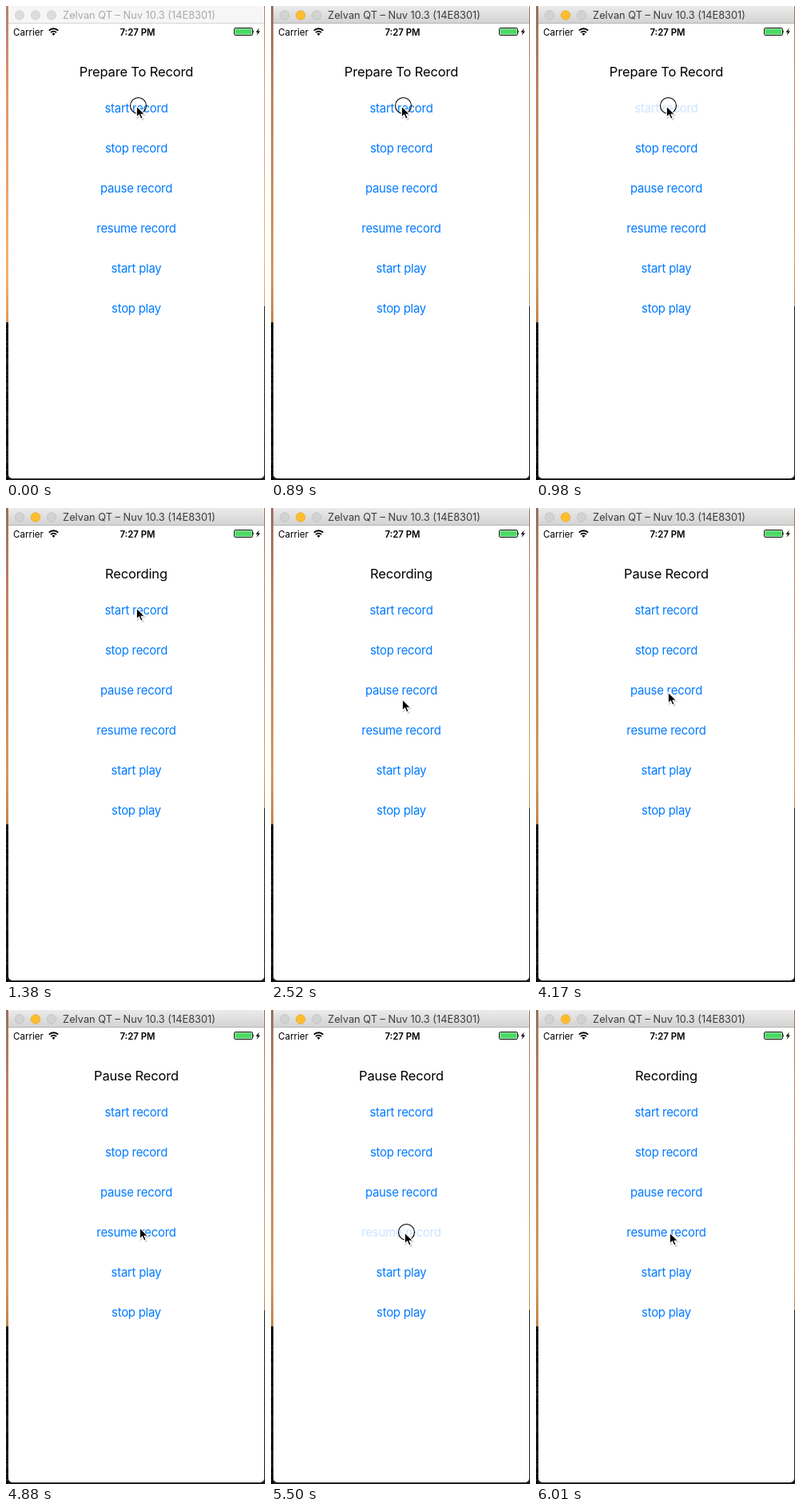
Write an HTML page that moves like this. It is 324 by 592 pixels and loops after 8 s.

```html
<!DOCTYPE html>
<html lang="en">
<head>
<meta charset="utf-8">
<title>Recorder demo</title>
<style>
html, body { margin: 0; width: 100%; height: 100%; overflow: hidden; }
svg { display: block; width: 324px; height: 592px; font-family: Inter, Roboto, sans-serif; }
.mid { text-anchor: middle; }
#buttons { font-size: 14.9px; letter-spacing: -.25px; fill: #007aff; }
#bar { fill: #f6f6f6; }
#rule { stroke: #d6d6d6; }
#caption { fill: #a9a9a9; }
#lights { fill: #dcdcdc; stroke: #d0d0d0; }
.active #bar { fill: url(#metal); }
.active #rule { stroke: #b5b5b5; }
.active #caption { fill: #3c3c3c; }
.active #lights { fill: #d2d2d2; stroke: #bebebe; }
.active #yellow { fill: #ffbd2e; stroke: #e6a82a; }
#shade { opacity: 0; }
.active #shade { opacity: .14; }
</style>
</head>
<body>
<svg id="stage" viewBox="0 0 324 592">
  <defs>
    <linearGradient id="sky" x2="0" y2="1">
      <stop offset="0" stop-color="#b5806a"/>
      <stop offset=".25" stop-color="#dc966c"/>
      <stop offset=".85" stop-color="#f4b26c"/>
      <stop offset="1" stop-color="#e09c58"/>
    </linearGradient>
    <linearGradient id="metal" x2="0" y2="1">
      <stop offset="0" stop-color="#ebebeb"/>
      <stop offset="1" stop-color="#d2d2d2"/>
    </linearGradient>
  </defs>

  <rect width="324" height="592" fill="#20231f"/>
  <rect width="3" height="395" fill="url(#sky)"/>
  <rect x="323" width="1" height="375" fill="url(#sky)"/>
  <g id="forest"></g>
  <rect id="shade" width="324" height="592"/>
  <rect x="3" y="-6" width="320" height="596" rx="5" fill="#fff"/>

  <path id="bar" d="M3 22V4q0-4 4-4H319q4 0 4 4V22z"/>
  <path id="rule" d="M3 21.5H323"/>
  <g id="lights" stroke-width=".8">
    <circle cx="17" cy="11.5" r="5.7"/>
    <circle id="yellow" cx="37" cy="11.5" r="5.7"/>
    <circle cx="57" cy="11.5" r="5.7"/>
  </g>
  <text id="caption" class="mid" x="166.5" y="16" font-size="12.8">Zelvan QT – Nuv 10.3 (14E8301)</text>

  <text x="9" y="36.5" font-size="11.6">Carrier</text>
  <g fill="none" stroke="#000" stroke-width="1.9">
    <path d="M53.8 30.7a7.8 7.8 0 0 1 11.4 0M56 33.1a4.9 4.9 0 0 1 7 0"/>
    <path d="M59.5 36.9l-2-2.2a2.8 2.8 0 0 1 4 0z" fill="#000" stroke="none"/>
  </g>
  <text class="mid" x="164.5" y="36.5" font-size="11.4" font-weight="600">7:27 PM</text>
  <rect x="285.5" y="27.5" width="23" height="9" rx="1.6" fill="#fff" stroke="#111"/>
  <rect x="286.5" y="28.5" width="21" height="7" rx=".7" fill="#4cd964"/>
  <path d="M309.3 30.3q1.7 1.7 0 3.4z"/>
  <path d="M316.8 27.5l-4.3 5.2h2.5l-1.5 4 4.5-5.3h-2.6z"/>

  <text id="status" class="mid" x="163" y="88" font-size="16.5" letter-spacing="-.16"></text>
  <g id="buttons" class="mid"></g>
  <circle id="ring" r="10" fill="none" stroke="#000" stroke-width="1.1"/>
  <g id="cursor">
    <path d="M1 2V17.5L5 14.5 7.5 19 10.5 18 8.7 13H13z" opacity=".18"/>
    <path d="M.8 1.2V15L4 12 6.2 17 8.6 16 6.6 11.2H11z" stroke="#fff" stroke-width="1.1"/>
  </g>
</svg>
<script>
const $ = id => document.getElementById(id);
const LOOP = 8000, ACTIVE_AT = 890, STEP = 80, FADE = 350;

const labels = ['start record', 'stop record', 'pause record', 'resume record', 'start play', 'stop play'];
$('buttons').innerHTML = labels.map((s, i) => `<text x="163" y="${132.5 + i * 50}">${s}</text>`).join('');
const buttons = [...$('buttons').children];

// Speckled treetops beside the window
for (let y = 396; y < 592; y += 2) {
  const light = 9 + 7 * Math.sin(y * y);
  $('forest').innerHTML += `<rect y="${y}" width="3" height="2" fill="hsl(110 8% ${light}%)"/>`;
}

const taps = [
  { press: 980, release: 1040, button: 0, status: 'Recording' },
  { press: 3730, release: 3820, button: 2, status: 'Pause Record' },
  { press: 5500, release: 5590, button: 3, status: 'Recording' }
];
const home = { x: 162, y: 124 };
const glides = [
  { at: 2090, steps: 3, x: 164, y: 246 },
  { at: 2440, steps: 6, x: 163, y: 234 },
  { at: 3410, steps: 2, x: 164, y: 229 },
  { at: 4700, steps: 6, x: 166, y: 277 }
];

const mix = (a, b, p) => a + (b - a) * p;
const easeOut = p => 1 - (1 - p) ** 3;
const stepsSince = (t, from) => Math.floor((t - from) / STEP) + 1;
const isPressed = (t, tap) => t >= tap.press && t < tap.release;

function buttonAlpha(t, tap) {
  if (isPressed(t, tap)) return .2;
  if (t < tap.press || t >= tap.release + FADE) return 1;
  return mix(.2, 1, Math.min(1, stepsSince(t, tap.release) * STEP / FADE));
}

function cursorAt(t) {
  let { x, y } = home;
  for (const g of glides) {
    if (t < g.at) break;
    const p = easeOut(Math.min(1, stepsSince(t, g.at) / g.steps));
    x = Math.round(mix(x, g.x, p));
    y = Math.round(mix(y, g.y, p));
  }
  return { x, y };
}

function draw(t) {
  $('stage').classList.toggle('active', t >= ACTIVE_AT);

  let status = 'Prepare To Record';
  for (const tap of taps) {
    if (t >= tap.release) status = tap.status;
    buttons[tap.button].style.opacity = buttonAlpha(t, tap);
  }
  $('status').textContent = status;

  const { x, y } = cursorAt(t);
  $('cursor').setAttribute('transform', `translate(${x + .5} ${y})`);
  $('ring').setAttribute('transform', `translate(${x + 3.5} ${y + .5})`);
  const activating = t < 90 || (t >= ACTIVE_AT && t < taps[0].press);
  const clicking = activating || taps.some(tap => isPressed(t, tap));
  $('ring').style.display = clicking ? '' : 'none';
}

const start = performance.now();
function tick() {
  draw((performance.now() - start) % LOOP);
  requestAnimationFrame(tick);
}
tick();
</script>
</body>
</html>
```
